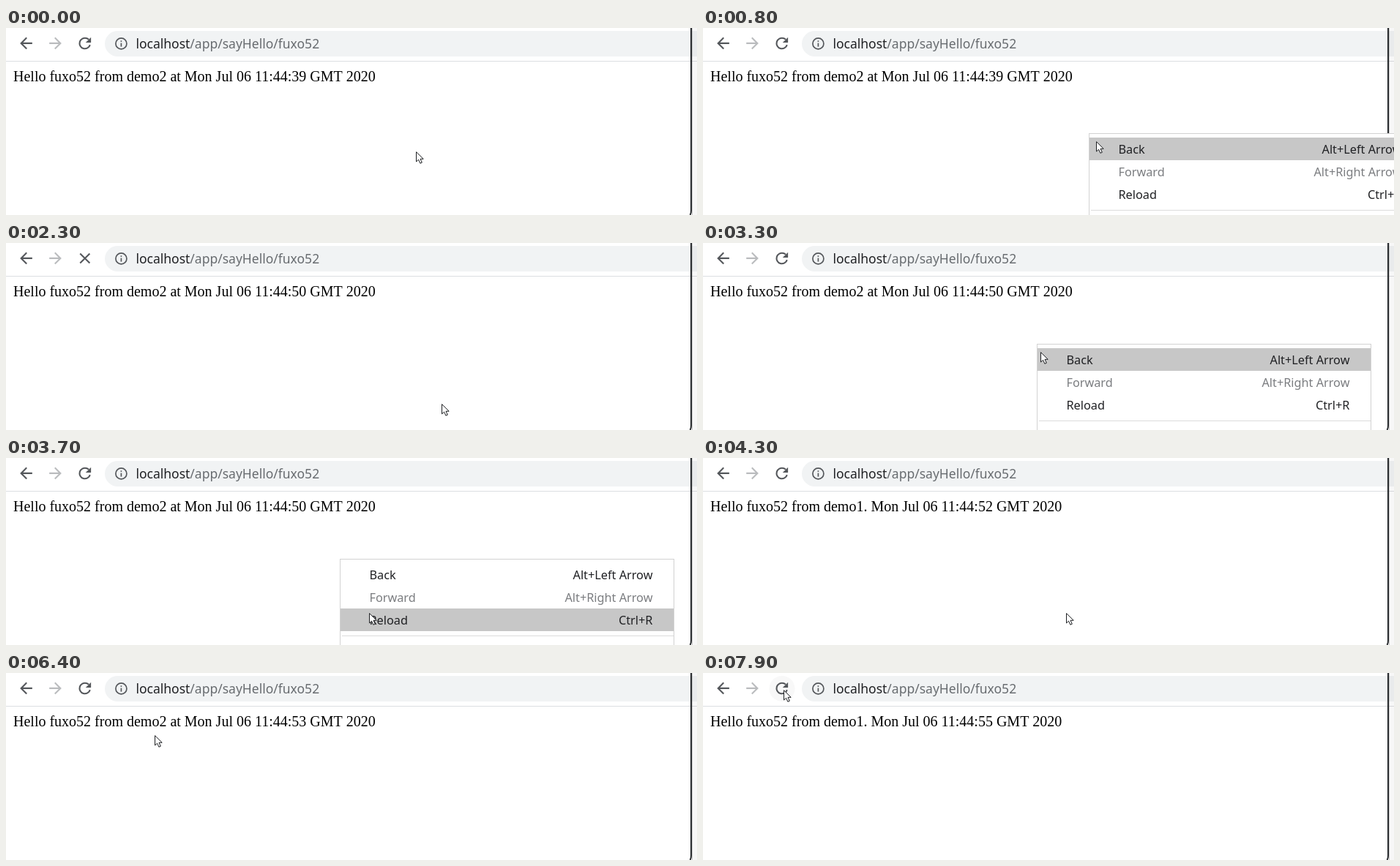
An HTML page with a canvas that plays this animation: 944x256 px, repeating every 8 s.

```html
<!DOCTYPE html>
<html lang="en">
<head>
<meta charset="utf-8">
<title>Reload demo</title>
<style>
  html, body { margin: 0; width: 100%; height: 100%; overflow: hidden; background: #fff; }
  canvas { display: block; }
</style>
</head>
<body>
<canvas id="stage" width="944" height="256"></canvas>
<script>
const ctx = document.getElementById('stage').getContext('2d');
const W = 944, H = 256, LOOP = 8000, STEP = 100;
const USER = 'fuxo52';
const SANS = '"Noto Sans", sans-serif';
const SERIF = '"Liberation Serif", "Times New Roman", serif';
const INK = '#54575b', PALE = '#babcbe', TEXT = '#202124';
const POINTER = new Path2D('M.5 .7V14L3.6 11.2 5.9 16.3 8.3 15.2 6 10.3H10.2Z');

// Each visit: go to (x, y), open a menu there, move by (dx, dy), click to reload
const VISITS = [
  { leave: 0, open: 700, click: 2000, x: 526, y: 143, dx: 69, dy: 77, from: 'demo2 at', sec: 50 },
  { leave: 2800, open: 3200, click: 3900, x: 455, y: 137, dx: 41, dy: 75, from: 'demo1.', sec: 52 },
  { leave: 4400, open: 4800, click: 5600, x: 474, y: 144, dx: 54, dy: 81, from: 'demo2 at', sec: 53 }
];
// The last reload uses the toolbar button
const BUTTON = { leave: 6100, click: 7100, x: 110, y: 23, from: 'demo1.', sec: 55 };
const RELOADS = [...VISITS, BUTTON];
const FIRST = { from: 'demo2 at', sec: 39 };
const ITEMS = [['Back', 'Alt+Left Arrow'], ['Forward', 'Alt+Right Arrow'], ['Reload', 'Ctrl+R']];

const progress = (t, start, length) => Math.min(1, Math.max(0, (t - start) / length));
const smooth = k => k * k * (3 - 2 * k);
const easeOut = (k, power) => 1 - (1 - k) ** power;

function pointerAt(t) {
  let x = 560, y = 169;
  const glide = (toX, toY, kx, ky = kx) => {
    x += (toX - x) * kx;
    y += (toY - y) * ky;
  };
  for (const v of VISITS) {
    glide(v.x, v.y, smooth(progress(t, v.leave, 300)));
    glide(v.x + v.dx, v.y + v.dy, smooth(progress(t, v.open, 400)));
  }
  // A curved sweep: the sideways part settles first
  const k = progress(t, BUTTON.leave, 900);
  glide(BUTTON.x, BUTTON.y, easeOut(k, 3.7), easeOut(k, 2.9));
  return { x: Math.round(x), y: Math.round(y) };
}

function rect(color, x, y, w, h) {
  ctx.fillStyle = color;
  ctx.fillRect(x, y, w, h);
}

function disc(color, x, y, r) {
  ctx.fillStyle = color;
  ctx.beginPath();
  ctx.arc(x, y, r, 0, Math.PI * 2);
  ctx.fill();
}

function text(str, x, y, color, font, align = 'left') {
  ctx.font = font;
  ctx.textAlign = align;
  ctx.fillStyle = color;
  ctx.fillText(str, x, y);
}

// Runs a path builder around the icon's centre, on a 24-unit grid
function icon(build, cx, cy, size, color, flip = 1) {
  ctx.save();
  ctx.translate(cx, cy);
  ctx.scale(flip * size / 24, size / 24);
  ctx.strokeStyle = ctx.fillStyle = color;
  ctx.lineWidth = 2;
  ctx.beginPath();
  build();
  ctx.stroke();
  ctx.restore();
}

function line(...points) {
  points.forEach(([x, y], i) => i ? ctx.lineTo(x, y) : ctx.moveTo(x, y));
}

function arrow() {
  line([8, 0], [-6.6, 0]);
  line([.7, -7.3], [-6.6, 0], [.7, 7.3]);
}

function reload() {
  line([1, -1], [8, -1], [8, -8]);
  ctx.fill();
  ctx.beginPath();
  ctx.arc(0, 0, 7, .29, -Math.PI / 4);
}

function stop() {
  line([-6.3, -6.3], [6.3, 6.3]);
  line([-6.3, 6.3], [6.3, -6.3]);
}

function info() {
  ctx.fillRect(-1, -5, 2, 2);
  ctx.fillRect(-1, -1, 2, 6);
  ctx.arc(0, 0, 9, 0, Math.PI * 2);
}

function drawToolbar(t) {
  rect('#dcdee1', 0, 45, W, 1);
  icon(arrow, 27.5, 20.9, 25, INK);
  icon(arrow, 67.5, 20.9, 25, PALE, -1);
  disc('#f8f8f8', 108, 21.4, 17.5 * progress(t, 6600, 500));
  const busy = RELOADS.some(r => t >= r.click + 100 && t < r.click + 350);
  icon(busy ? stop : reload, 107.8, 21, 25, INK);

  ctx.fillStyle = '#f1f3f4';
  ctx.beginPath();
  ctx.roundRect(135, 4, W, 35, 17.5);
  ctx.fill();
  icon(info, 157.4, 21.4, 20, INK);

  const font = '17.5px ' + SANS, host = 'localhost', x = 177.4;
  text(host, x, 28, TEXT, font);
  text('/app/sayHello/' + USER, x + ctx.measureText(host).width, 28, '#686c70', font);
}

function drawPage(t) {
  const { from, sec } = RELOADS.filter(r => t >= r.click + 200).pop() || FIRST;
  text(`Hello ${USER} from ${from} Mon Jul 06 11:44:${sec} GMT 2020`, 10, 73, '#000', '20px ' + SERIF);
}

// Right side of the window, with its rounded lower corner and soft shadow
function drawEdge() {
  rect('rgba(0, 0, 0, .03)', 937, 0, W - 937, H);
  rect('rgba(0, 0, 0, .2)', 937, 0, 1, H);
  ctx.strokeStyle = '#2a2d30';
  ctx.lineWidth = 2;
  ctx.beginPath();
  ctx.moveTo(936, 0);
  ctx.lineTo(936, 250);
  ctx.quadraticCurveTo(936, 254, 934.5, H);
  ctx.stroke();
}

function drawMenu(x, y, pointer) {
  const w = 457, row = 31, font = '16.25px ' + SANS;
  rect('#d2d2d2', x, y, w, H - y);
  rect('#fff', x + 1, y + 1, w - 2, H - y);
  const hot = Math.floor((pointer.y - y - 6) / row);
  ITEMS.forEach(([label, keys], i) => {
    const off = label === 'Forward', top = y + 6 + row * i;
    if (i === hot && !off) rect('#c7c7c7', x + 1, top, w - 2, row);
    const color = off ? '#7b7d80' : TEXT;
    text(label, x + 40.5, top + 22, color, font);
    text(keys, x + 427.4, top + 22, color, font, 'right');
  });
  rect('#dcdcdc', x + 3, y + 105, w - 4, 1);
}

function drawPointer({ x, y }) {
  ctx.save();
  ctx.translate(x, y);
  ctx.fillStyle = '#fff';
  ctx.fill(POINTER);
  ctx.strokeStyle = '#1d1f22';
  ctx.lineWidth = 1;
  ctx.lineJoin = 'round';
  ctx.stroke(POINTER);
  ctx.restore();
}

function draw(t) {
  const pointer = pointerAt(t);
  rect('#fff', 0, 0, W, H);
  drawToolbar(t);
  drawPage(t);
  drawEdge();
  const menu = VISITS.find(v => t >= v.open && t < v.click);
  if (menu) drawMenu(menu.x + 1, menu.y + 1, pointer);
  drawPointer(pointer);
}

const start = performance.now();
function tick() {
  const t = (performance.now() - start) % LOOP;
  draw(Math.floor(t / STEP) * STEP);
  requestAnimationFrame(tick);
}
tick();
</script>
</body>
</html>
```
